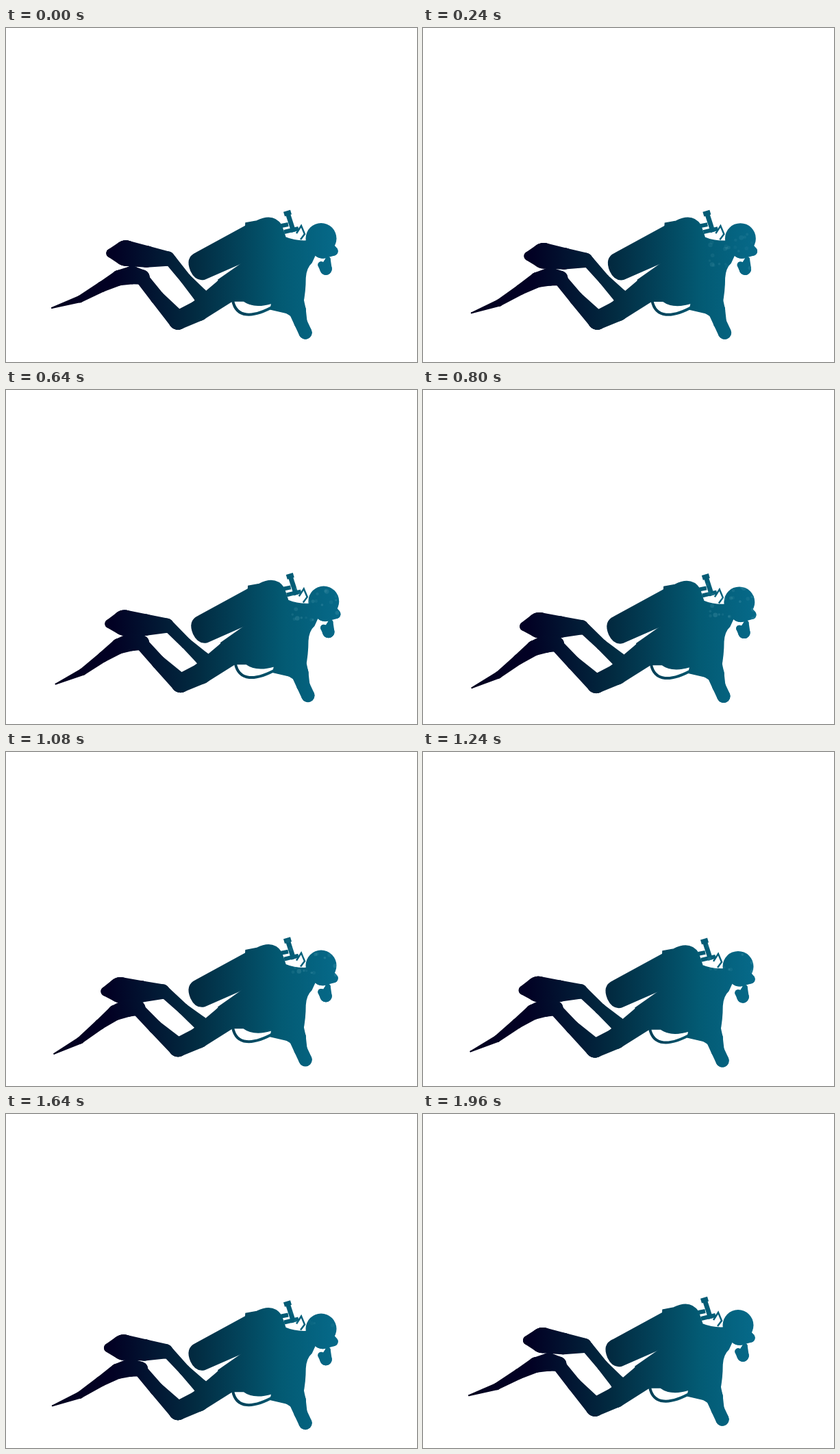
An HTML page with a canvas for the animation above (2 s loop, 600x488 px).

```html
<!DOCTYPE html>
<html lang="en">
<head>
<meta charset="utf-8">
<title>Diver</title>
<style>
html, body { margin: 0; background: #fff; overflow: hidden; }
canvas { display: block; }
</style>
</head>
<body>
<canvas id="stage" width="600" height="488"></canvas>
<script>
const ctx = document.getElementById('stage').getContext('2d');
const LOOP = 2000, STEP = 40;

const torso = new Path2D(`M310 368L332 399H347Q362 410 388 402L386 411L412 417L433 404
  Q437 385 437 365Q438 350 446 343L452 330L440 311Q422 312 408 306L402 288Q390 270 366 282L350 285L347 342Z`);
const tank = new Path2D('M354 287L277 329Q262 336 270 355Q277 370 290 367L347 342L380 330Z');
const hose = new Path2D('M331 398C336 424 360 424 392 406');
const valve = new Path2D('M411 270L420 298M406 272L416 269');
const fittings = new Path2D('M402 289L412 287M406 298L427 293');
const thinHose = new Path2D('M424 300L431 289L436 301L430 309');

const skin = ctx.createLinearGradient(66, 0, 486, 0);
['#02001f', '#020124', '#022b41', '#035a73', '#066a8a']
  .forEach((color, i) => skin.addColorStop([0, .22, .5, .8, 1][i], color));

let seed = 7;
const rnd = () => (seed = seed * 16807 % 2147483647) / 2147483647;
const bubbles = Array.from({ length: 34 }, () => ({
  x: 484 - 72 * rnd() ** 1.6, y: 294 + rnd() * 66, r: 1.5 + rnd() * 2, a: .05 + rnd() * .12
}));

function disc(x, y, r) {
  ctx.beginPath();
  ctx.arc(x, y, r, 0, 7);
  ctx.fill();
}

function line(path, width) {
  ctx.lineWidth = width;
  ctx.stroke(path);
}

function solid(path) {
  ctx.fill(path);
  line(path, 1.5);
}

// Chain of round joints [x, y, radius], each pair joined by its tangents.
function limb(...joints) {
  joints.forEach(([x, y, r], i) => {
    disc(x, y, r + .7);
    if (!i) return;
    const [px, py, pr] = joints[i - 1];
    const dir = Math.atan2(y - py, x - px);
    const lean = Math.acos((pr - r) / Math.hypot(x - px, y - py));
    ctx.beginPath();
    ctx.arc(px, py, pr + .7, dir + lean, dir - lean + 2 * Math.PI);
    ctx.arc(x, y, r + .7, dir - lean, dir + lean);
    ctx.fill();
  });
}

function turn(x, y, angle) {
  ctx.translate(x, y);
  ctx.rotate(angle);
  ctx.translate(-x, -y);
}

// The calf swings on the knee, then the fin bends on the ankle.
function leg(knee, swing, calf, bend, fin) {
  const [ax, ay] = calf[calf.length - 1];
  ctx.save();
  turn(...knee, swing);
  limb(...calf);
  turn(ax, ay, bend);
  limb(...fin);
  ctx.restore();
}

function drawDiver(kick) {
  ctx.fillStyle = ctx.strokeStyle = skin;
  leg([290, 392], -.15 * kick, [[284, 391, 10], [262, 366, 7.5], [240, 339, 8]],
    .058 * kick, [[236, 337, 10], [205, 334, 15], [175, 329, 18], [153, 329, 6]]);
  leg([251, 427], -.1 * kick, [[251, 427, 13], [221, 394, 9.5], [199, 366, 9]],
    -.07 * kick, [[199, 364, 10], [184, 361, 12.5], [165, 365, 10.5], [140, 378, 7], [108, 396, 4.5], [67, 409, .3]]);
  limb([251, 427, 13], [281, 413, 14.5], [322, 383, 18]);
  [tank, torso].forEach(solid);
  limb([411, 392, 21.5], [425, 412, 12], [430, 430, 9], [437, 445, 9]);
  disc(460, 307.5, 22.5);
  limb([462, 321, 15], [478, 326, 6]);
  limb([470, 338, 3], [467, 352, 8], [460, 346, 4]);
  line(hose, 4);
  line(valve, 7);
  line(fittings, 6);
  line(thinHose, 2.5);
}

function drawBubbles(t) {
  const fade = Math.min(1, t / 350, Math.max(0, (1800 - t) / 350));
  ctx.fillStyle = '#8fd0de';
  ctx.globalCompositeOperation = 'source-atop';
  for (const { x, y, r, a } of bubbles) {
    ctx.globalAlpha = a * fade;
    disc(x + 3 * Math.sin(t / 300 + r * 9), y - t * .03, r);
  }
  ctx.globalAlpha = 1;
  ctx.globalCompositeOperation = 'source-over';
}

function draw(now) {
  const t = Math.floor(now % LOOP / STEP) * STEP;
  const u = t / LOOP;
  const kick = 1.09 * (1 - Math.abs(2 * u - 1));
  const surge = 4.6 * Math.sin(Math.PI * Math.min(1, u / .46));
  const sink = 7 * Math.sin(Math.PI * u ** 2.4);
  ctx.clearRect(0, 0, 600, 488);
  ctx.save();
  ctx.translate(surge, sink);
  drawDiver(kick);
  ctx.restore();
  drawBubbles(t);
}

const start = performance.now();
function frame() {
  draw(performance.now() - start);
  requestAnimationFrame(frame);
}
frame();
</script>
</body>
</html>
```
